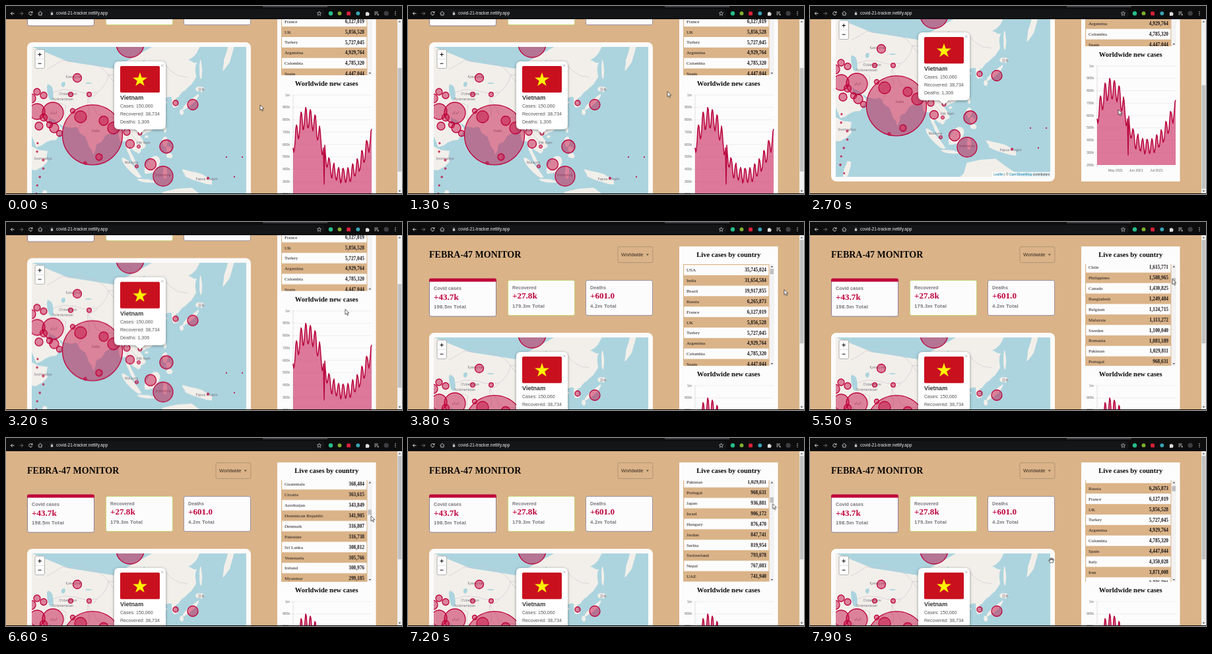
Recreate the animation shown at these times as an HTML page. Size 600 px wide and 285 px high, loop 8 s.

```html
<!DOCTYPE html>
<html lang="en">
<head>
<meta charset="utf-8">
<title>Case dashboard</title>
<style>
html, body { margin: 0; width: 100%; height: 100%; overflow: hidden; background: #dab388; }
svg { display: block; width: 600px; height: 285px; }
text { white-space: pre; }
.sans { font-family: "Liberation Sans", Arial, sans-serif; }
.serif { font-family: "Liberation Serif", "Times New Roman", serif; }
.world { font-family: "Noto Sans", "DejaVu Sans", "Noto Sans CJK JP", "Noto Sans CJK", sans-serif; }
</style>
</head>
<body>
<svg id="stage" viewBox="0 0 600 285" xmlns="http://www.w3.org/2000/svg"></svg>
<script>
const LOOP = 8000, TAN = '#dab388', RED = '#bf033b', SEA = '#acd4de';
const stage = document.getElementById('stage');

function add(parent, tag, attrs = {}) {
  const el = document.createElementNS('http://www.w3.org/2000/svg', tag);
  for (const k in attrs) el.setAttribute(k, attrs[k]);
  parent.append(el);
  return el;
}
const group = (p, attrs) => add(p, 'g', attrs);
const rect = (p, x, y, width, height, fill, more) => add(p, 'rect', { x, y, width, height, fill, ...more });
const path = (p, d, fill, more) => add(p, 'path', { d, fill, ...more });
const line = (p, d, stroke, w = 1, more) => path(p, d, 'none', { stroke, 'stroke-width': w, ...more });
const dot = (p, cx, cy, r, fill, more) => add(p, 'circle', { cx, cy, r, fill, ...more });
// y is the middle of the line of text
function text(p, str, x, y, size, fill, more) {
  const el = add(p, 'text', { x, y: y + size * 0.34, 'font-size': size, fill, class: 'sans', ...more });
  el.textContent = str;
  return el;
}
const bold = { 'font-weight': 700 };
const serifBold = { class: 'serif', ...bold };
const mid = { 'text-anchor': 'middle' }, end = { 'text-anchor': 'end' };
function clip(id, x, y, w, h) {
  rect(add(stage, 'clipPath', { id }), x, y, w, h, '#000');
  return { 'clip-path': `url(#${id})` };
}
let seed = 7;
const rand = () => (seed = seed * 16807 % 2147483647) / 2147483647;
const trace = pts => 'M' + pts.map(([x, y]) => x.toFixed(1) + ' ' + y.toFixed(1)).join('L');

const page = group(stage);

// header and cards
text(page, 'FEBRA-47 MONITOR', 32, 49.5, 14, '#0b0806', serifBold);
rect(page, 318, 37.5, 53, 24, 'none', { rx: 2, stroke: '#a98e70', 'stroke-width': 0.8 });
text(page, 'Worldwide', 323, 49.8, 7.2, '#33291f');
path(page, 'M360.6 48.6h4.4l-2.2 2.3z', '#5e4c39');

function card(x, y, h, edge, label, value, total) {
  rect(page, x + 0.5, y + 0.5, 101, h - 1, '#fdfcfd', { rx: 2.5, stroke: edge, 'stroke-width': 1 });
  const top = y === 86 ? 101 : 99.5;
  text(page, label, x + 7, top, 7.2, '#77757a', bold);
  text(page, value, x + 7, top + 12.2, 13.1, RED, serifBold);
  text(page, total, x + 7, top + 27.5, 7.8, '#77757a', { ...bold, 'letter-spacing': 0.2 });
}
card(32, 86, 57.5, '#8b7f96', 'Covid cases', '+43.7k', '198.5m Total');
path(page, 'M32 90.5v-2.5q0-2.5 2.5-2.5h97q2.5 0 2.5 2.5v2.5z', RED);
card(151, 88, 54, '#c9d77e', 'Recovered', '+27.8k', '179.3m Total');
card(269, 88, 54, '#9a93a0', 'Deaths', '+601.0', '4.2m Total');

// map, drawn 113 px above its place on the page
rect(page, 32, 168, 339, 255, '#fcfbfa', { rx: 8 });
const map = group(group(page, clip('mapClip', 39, 175, 325, 241)), { transform: 'translate(0 113)' });
rect(map, 39, 62, 325, 241, SEA);

// splits every edge and nudges the new point, twice
function rough(pts, rounds = 2) {
  if (!rounds) return pts;
  const out = [pts[0]];
  for (let i = 1; i < pts.length; i++) {
    const [a, b] = pts[i - 1], [c, d] = pts[i], k = (rand() - 0.5) * 0.28;
    out.push([(a + c) / 2 + (d - b) * k, (b + d) / 2 - (c - a) * k], [c, d]);
  }
  return rough(out, rounds - 1);
}
const parse = s => s.split(' ').map(p => p.split(',').map(Number));
function blob([x, y, rx, ry, deg = 0], fill) {
  const pts = Array.from({ length: 14 }, (_, i) => {
    const a = i * Math.PI / 7, k = 0.85 + rand() * 0.3;
    return [rx * k * Math.cos(a), ry * k * Math.sin(a)];
  });
  path(map, trace(pts) + 'z', fill, { transform: `translate(${x} ${y}) rotate(${deg})` });
}
const coast = '30,58 295,58 276,82 289,86 288,108 271,128 257,140 261,152 254,154 251,138 234,140 245,146 232,153 243,162 234,183 213,192 203,197 212,213 201,224 187,213 199,243 189,232 182,205 174,206 168,189 155,194 138,209 132,226 120,198 106,183 82,179 64,167 67,182 80,178 88,189 76,203 46,214 30,180';
path(map, trace(rough(parse(coast))) + 'z', '#f2efea');
// x, y, half width, half height, turn: Kamchatka to Madagascar
const islands = '338,72,5,26,18 295,97,2,15 294,126,6,4 280,146,17,3.2,-42 266,161,3,4 241,187,2,5 213,198,2.6,2 241,206,4,9 246,217,4,4 248,227,5,4 222,242,9,15,35 190,246,20,4.5,47 213,265,13,2.5,8 241,252,3,10 290,259,25,6.5,20 270,310,48,33 140,228,2.5,4 36,232,28,17,-8 56,292,4,15,15';
for (const b of parse(islands)) blob(b, '#f2efea');
for (const b of parse('67,130,5,12,-12 87,119,3,4 125,117,5,1 206,88,1,8,35')) blob(b, SEA);
const borders = ['62,96 113,80 155,104 215,102 241,88 262,106 275,108', '155,104 138,131 124,140 137,163 168,173 184,175 213,192', '155,104 180,130 220,128 238,114 230,102', '71,131 105,128 138,131', '109,187 126,165 124,140', '91,180 91,151 74,146', '182,205 188,193 202,207'];
for (const b of borders) line(map, trace(rough(parse(b))), '#cdbfd0', 0.6);

for (const [s, x, y] of [
  ['Қазақстан', 103, 107], ['Oʻzbekiston', 94, 133], ['Türkmenistan', 86, 141],
  ['ایران', 72, 161], ['India', 136, 189], ['Việt Nam', 208, 207], ['Malaysia', 190, 237],
  ['Indonesia', 238, 256], ['Papua Niugini', 304, 262], ['Soomaaliya', 56, 231], ['日本', 296, 126]
]) text(map, s, x, y, 5, '#756f7d', { class: 'world', ...mid });

const bubble = (x, y, r) => dot(map, x, y, r, RED, { 'fill-opacity': 0.46, stroke: RED, 'stroke-width': r > 3 ? 1.3 : 1 });
const cases = '131,195.3,45.5 188,57,21 108,109,6.5 98,134,3.3 126,134,3.3 38,140,7 47,130,5 57,135.5,5 71,162,16 47,160,12 101,159,3.5 113,168,9 148,174,7 163,185,9 57,169,5.5 50,182,6 66,180,4.5 73,185,7 81,193,4.5 183,191,5 203,193,3 188,209,6.5 201,213,2.5 243,213,10 198,243,2.5 219,240,8.5 238,258,15 141,229,5 120,238,2.2 257,147,4 283,149.5,8 306,261,1.5';
for (const c of parse(cases)) bubble(...c);
// island specks: African coast, then the Pacific
for (let i = 0; i < 8; i++) bubble(45 + rand() * 18, 208 + i * 12.8, 1 + rand() * 0.6);
for (let i = 0; i < 3; i++) dot(map, 334 + i * 12, 229 + (i % 2) * 30, 1.1, RED);

// zoom buttons
rect(map, 44, 66, 14.5, 28.5, '#fff', { rx: 2, stroke: '#a9a8a5', 'stroke-width': 0.9 });
line(map, 'M44 80.3h14.5', '#ccc', 0.6);
line(map, 'M48.4 73.5h5.4M51.1 70.8v5.4M48.6 87.3h5', '#111', 1.1);

// popup
const popup = group(map, { style: 'filter:drop-shadow(0 1px 2px rgba(0,0,0,.4))' });
path(popup, 'M171 84h64q7 0 7 7v89q0 7-7 7h-25l-7 6.5-7-6.5h-25q-7 0-7-7v-89q0-7 7-7z', '#fff');
line(map, 'M235 88.3l3.6 3.6M238.6 88.3l-3.6 3.6', '#b5b5b5', 0.9);
rect(map, 173, 91, 60, 40.3, '#c9101f', { rx: 2 });
path(map, trace(Array.from({ length: 10 }, (_, i) => {
  const r = i % 2 ? 4.4 : 11.5, a = i * Math.PI / 5;
  return [203 + r * Math.sin(a), 112 - r * Math.cos(a)];
})) + 'z', '#fff200');
text(map, 'Vietnam', 173, 139, 9.1, '#333', bold);
['Cases: 150,060', 'Recovered: 38,734', 'Deaths: 1,306'].forEach((s, i) =>
  text(map, s, 173, 152 + i * 11.7, 7.1, '#555'));

// attribution
rect(map, 276, 295.5, 88, 7.5, '#fff', { 'fill-opacity': 0.7 });
const credit = text(map, '', 363.3, 299.2, 4.9, '#333', end);
for (const [s, fill] of [['Leaflet', '#0078a8'], [' | © ', '#333'], ['OpenStreetMap', '#0078a8'], [' contributors', '#333']])
  add(credit, 'tspan', { fill }).textContent = s;

// right column
rect(page, 411, 37, 149.5, 386, '#fdfcfd');
text(page, 'Live cases by country', 485.7, 49.2, 10.55, '#0c0a0b', { ...serifBold, ...mid });
text(page, 'Worldwide new cases', 485.7, 230.7, 10.5, '#0c0a0b', { ...serifBold, ...mid });

// countries without a count get one between their neighbours
const countries = `USA 35745024|India 31654584|Brazil 19917855|Russia 6265873|France 6127019|UK 5856528|Turkey 5727045|Argentina 4929764|Colombia 4785320|Spain 4447044|Italy 4350028|Iran 3871008|Germany 3776781|Indonesia|Poland|Mexico|South Africa|Ukraine|Peru|Netherlands|Czechia|Iraq|Chile 1615771|Philippines 1588965|Canada 1430825|Bangladesh 1249484|Belgium 1124715|Malaysia 1113272|Sweden 1100040|Romania 1083189|Pakistan 1029811|Portugal 968631|Japan|Israel|Hungary|Jordan|Serbia|Switzerland|Nepal|UAE|Austria|Thailand|Morocco|Tunisia|Kazakhstan|Lebanon|Saudi Arabia|Greece|Ecuador|Bolivia|Paraguay|Belarus|Panama|Bulgaria|Georgia|Costa Rica|Cuba|Kuwait|Slovakia|Uruguay|Guatemala 368484|Croatia 363615|Azerbaijan 343849|Dominican Republic 341905|Denmark 316807|Palestine 316738|Sri Lanka 308812|Venezuela 305766|Ireland 300976|Myanmar 299185|Honduras|Oman|Lithuania 282925`
  .split('|').map(s => ({ name: s.replace(/ \d+$/, ''), count: +(s.match(/\d+$/) || 0) }));
countries.forEach((c, i) => {
  if (c.count) return;
  const gap = countries.slice(i).findIndex(n => n.count), prev = countries[i - 1].count;
  c.count = Math.round(prev * (countries[i + gap].count / prev) ** (1 / (gap + 1)));
});
const ROW = 15.87;
const list = group(group(page, clip('listClip', 417, 64, 138, 154)));
rect(list, 417.5, 64.6, 129.5, ROW * 222, '#fdfcfd', { stroke: TAN, 'stroke-width': 1.2 });
countries.forEach(({ name, count }, i) => {
  const y = 64.8 + i * ROW;
  if (i % 2) rect(list, 418, y, 129, ROW, TAN);
  text(list, name, 422, y + 8, 7.1, '#161214', { class: 'serif' });
  text(list, count.toLocaleString('en-US'), 543, y + 8, 7.3, '#161214', { ...serifBold, ...end });
});
rect(page, 547.8, 64, 7, 154, '#f3f2f3');
path(page, 'M549.4 68.4l1.9-2.2 1.9 2.2zM549.4 213.9l1.9 2.2 1.9-2.2z', '#505050');
const listThumb = rect(page, 548.4, 71, 5.6, 8, '#c0bfc1');

// chart
const chartY = v => 248 + (1000 - v) * 0.1875;
for (let v = 200; v <= 1000; v += 100) {
  line(page, `M432 ${chartY(v)}H554.5`, '#e6e3e5', 0.6);
  text(page, v === 1000 ? '1m' : v + 'k', 430, chartY(v), 5.1, '#666', end);
}
line(page, 'M435 248V401', '#d6d3d5', 0.7);
['May', 'Jun', 'Jul'].forEach((m, i) => {
  line(page, `M${463 + i * 31} 398v3`, '#d6d3d5', 0.6);
  text(page, m + ' 2021', 463 + i * 31, 406, 5.1, '#666', mid);
});
// a spring wave, a summer rise and a weekly rhythm, with one bad day
function newCases(day) {
  const wave = 455 * Math.exp(-((Math.abs(day - 22) / 26) ** 2.6));
  const rise = 305 * (Math.max(0, day - 85) / 34) ** 1.5;
  const level = 355 + wave + rise;
  const week = Math.cos((day - 5) / 7.1 * 2 * Math.PI);
  return day === 47 ? 280 : level + (40 + level * 0.062) * week + (rand() - 0.5) * 24;
}
const curve = trace(Array.from({ length: 120 }, (_, d) => [435 + d, chartY(newCases(d))]));
path(page, curve + 'V398H435z', '#c4114f', { 'fill-opacity': 0.56 });
line(page, curve, '#b8063c', 1.5, { 'stroke-linejoin': 'round' });

// window scrollbar
rect(stage, 593, 20, 7, 265, '#f1f1f1');
path(stage, 'M594.6 24.6l1.9-2.2 1.9 2.2zM594.6 279.6l1.9 2.2 1.9-2.2z', '#505050');
const pageThumb = rect(stage, 593.6, 27, 5.8, 157, '#c1c1c1');

// browser bar
rect(stage, 0, 0, 600, 20, '#0d0d0e');
rect(stage, 389, 0, 98, 2, '#3a3b3e');
rect(stage, 47, 4.5, 436, 13.5, '#141517', { rx: 6.7 });
line(stage, 'M12.6 11.3H7.4M9.7 8.9L7.3 11.3l2.4 2.4', '#e4e4e4', 0.9);
line(stage, 'M20.5 11.3h5.2M23.4 8.9l2.4 2.4-2.4 2.4', '#77787a', 0.9);
line(stage, 'M39.6 9.8a2.6 2.6 0 1 0 .2 2.4M40 8.1v2.1h-2.1', '#e4e4e4', 0.9);
line(stage, 'M48.7 11.2l3.2-2.9 3.2 2.9M49.8 10.8v3.1h4.2v-3.1', '#e4e4e4', 0.8);
rect(stage, 69.6 - 1.8, 10.5, 3.4, 3, '#d2d3d5', { rx: 0.5 });
line(stage, 'M68.5 10.7v-.9a1 1 0 0 1 2 0v.9', '#d2d3d5', 0.7);
text(stage, 'covid-21-tracker.netlify.app', 76, 11.2, 6.6, '#ececec');
path(stage, 'M474.5 8l.9 2.2 2.3.2-1.8 1.6.6 2.3-2-1.3-2 1.3.6-2.3-1.8-1.6 2.3-.2z', 'none', { stroke: '#cfd0d2', 'stroke-width': 0.7 });
dot(stage, 492, 11.2, 3.2, '#27bd8a');
dot(stage, 505.5, 11.2, 2.9, '#7fae2f');
rect(stage, 516.2, 8.4, 5.8, 5.8, '#d9203a', { rx: 1 });
dot(stage, 533.3, 11.2, 2.9, '#39a3b5');
path(stage, 'M544.9 9.7h1.5a1 1 0 1 1 2 0h1.5v1.5a1 1 0 1 1 0 2v1.5h-5z', '#dedede');
line(stage, 'M558.3 9h5.4M558.3 11h5.4M558.3 13h2.7', '#dedede', 0.8);
dot(stage, 563.6, 13.3, 1, '#dedede');
dot(stage, 576.2, 11.2, 3.6, '#3c3e42');
for (const y of [8.8, 11.2, 13.6]) dot(stage, 590, y, 0.7, '#e4e4e4');
rect(stage, 0, 284, 600, 1, '#0b0908');

// pointer
const pointer = group(stage);
const edge = { stroke: '#222', 'stroke-width': 0.7, 'stroke-linejoin': 'round' };
const arrow = path(pointer, 'M0 0v8l1.9-1.7 1.3 3 1.4-.6-1.3-2.9h2.6z', '#fff', edge);
const hand = path(pointer, 'M1.8 8L-.2 5.2q-.3-1 .8-.8l1 1L.9 2q.5-1 1.2 0l.7 2 .1-3q.6-1 1.2 0l.2 3 .8-2.6q.8-.7 1.1.2l-.5 2.9.9-1.6q.8-.4.9.5L6.2 8z', '#fff', edge);

// motion steps: [ms, values...]
const scroll = [[0, 113], [1650, 113], [2200, 157], [3000, 157], [3550, 0], [LOOP, 0]];
const drag = [[0, 0], [4480, 0], [5500, 352.6], [6600, 954.7], [6800, 985], [7550, 44], [LOOP, 44]];
const move = [[0, 385, 150], [1300, 393, 129.5], [2700, 467, 157], [3800, 570, 102.5], [4200, 548, 79], [4480, 548, 79], [5500, 549, 86.5], [6600, 553, 118], [6800, 553, 119.5], [7550, 552, 82], [7900, 362, 181], [LOOP, 362, 181]];

function animate(el, steps, frame, easing = 'linear') {
  el.animate(steps.map(([t, ...v]) => ({ offset: t / LOOP, easing, ...frame(...v) })),
    { duration: LOOP, iterations: Infinity });
}
const shift = (x, y) => ({ transform: `translate(${x}px, ${y}px)` });
animate(page, scroll, y => shift(0, -y), 'ease-in-out');
animate(pageThumb, scroll, y => shift(0, y * 93 / 157), 'ease-in-out');
animate(list, drag, y => shift(0, -y));
animate(listThumb, drag, y => shift(0, y * 0.0394));
animate(pointer, move, shift);
animate(arrow, [[0, 1], [7880, 0], [LOOP, 0]], opacity => ({ opacity }), 'step-end');
animate(hand, [[0, 0], [7880, 1], [LOOP, 1]], opacity => ({ opacity }), 'step-end');
</script>
</body>
</html>
```
